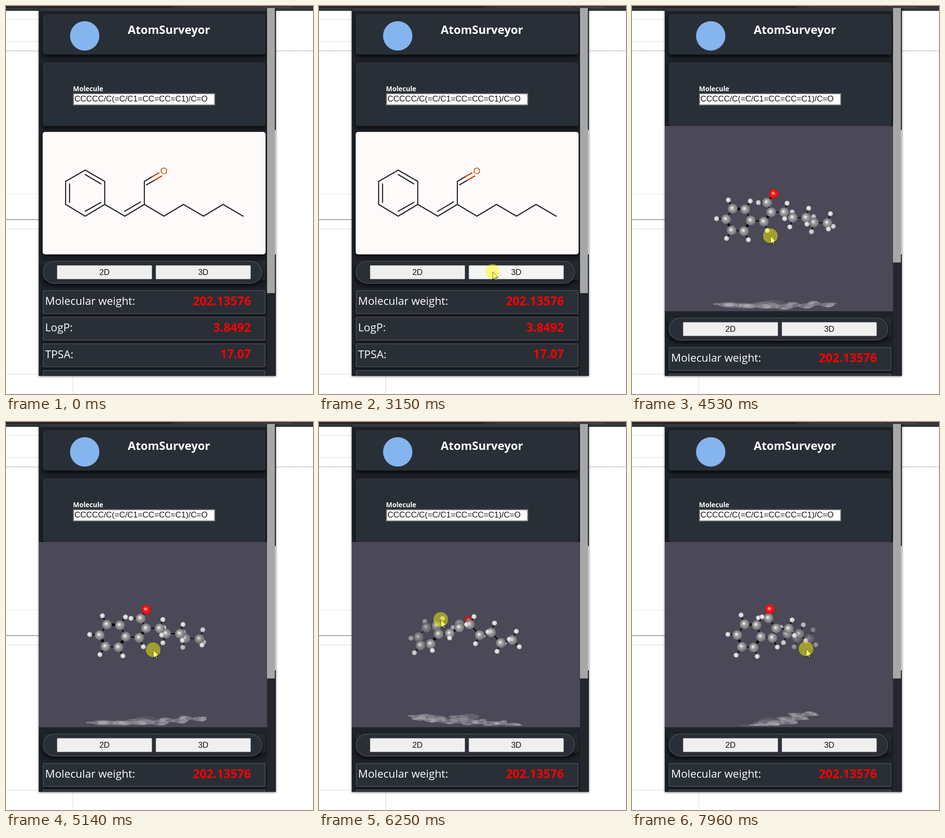
An HTML page with a canvas that plays this animation: 628 px wide and 792 px high, repeating every 8000 ms.

```html
<!DOCTYPE html>
<html lang="en">
<head>
<meta charset="utf-8">
<title>Molecule viewer</title>
<style>
  html, body { margin: 0; width: 100%; height: 100%; overflow: hidden; background: #fff; }
  svg, canvas { position: absolute; left: 0; top: 0; width: 628px; height: 792px; }
  text { font-family: "Open Sans", sans-serif; fill: #fff; }
  .ui { font: 16.6px "Liberation Sans", Arial, sans-serif; fill: #111; }
  .label { font-size: 22.3px; }
  .value { font-size: 24.5px; font-weight: 700; fill: #f00; text-anchor: end; }
  .card { fill: #292f36; filter: drop-shadow(0 5px 5px #000b); }
  .row { fill: #292f36; stroke: #41454b; stroke-width: 2; filter: drop-shadow(0 3px 3px #0008); }
  .button { fill: #efefef; stroke: #858585; }
  .bond { fill: none; stroke: #222; stroke-width: 2.2; stroke-linejoin: round; stroke-linecap: round; }
  .page { fill: none; stroke: #ddd; }
</style>
</head>
<body>
<svg viewBox="0 0 628 792">
  <defs>
    <clipPath id="popupClip"><path d="M67 4H552V755H67Z"/></clipPath>
    <linearGradient id="strip" x2="0" y2="1"><stop stop-color="#d8d8d8"/><stop offset="1" stop-color="#fff"/></linearGradient>
  </defs>

  <!-- page behind the popup -->
  <path fill="#35363a" d="M0 0H628V10H0Z"/>
  <path fill="#26272b" d="M0 0H340Q338 4 330 4H0Z"/>
  <path fill="none" stroke="#55575c" d="M362 0q4 3 12 3H520M524 0q4 3 12 3H578q6 0 8-3"/>
  <path fill="url(#strip)" d="M0 90H628V95H0Z"/>
  <path class="page" d="M0 27.5H67M0 72.5H67M0 455.5H67M0 751.5H136M136.5 755V792"/>
  <path class="page" stroke-opacity=".5" d="M0 383.5H67"/>
  <path fill="#aaa" d="M0 435H67V437H0Z"/>

  <!-- popup -->
  <path d="M67 4H552V755H67Z" fill="#1e2329" style="filter:drop-shadow(0 1px 2px #0009)"/>
  <g clip-path="url(#popupClip)">
    <path fill="#35363a" d="M67 4H534V10H67Z"/>
    <rect class="card" x="75" y="17" width="456" height="82" rx="5"/>
    <circle cx="161" cy="61" r="30" fill="#84b5ee"/>
    <text x="249" y="57" font-size="23.5" font-weight="700">AtomSurveyor</text>
    <rect class="card" x="75" y="115" width="456" height="130" rx="5"/>
    <text x="137" y="174" font-size="13.7" font-weight="700">Molecule</text>
    <rect x="138" y="179" width="289" height="23" fill="#fff" stroke="#767676" stroke-width="2"/>
    <text class="ui" x="140" y="195">CCCCC/C(=C/C1=CC=CC=C1)/C=O</text>

    <g id="flat">
      <rect x="75" y="257" width="456" height="250" rx="5" fill="#fffafa" style="filter:drop-shadow(0 4px 5px #000a)"/>
      <path class="bond" d="M122 358L162 335 202 358V405L162 429 122 405ZM130 363V401M162 344L194 363M162 419L194 401
        M202 405L243 429 283 405 323 429 363 405 404 429 444 405 485 429M243 419L275 400M283 405V358L299 348.5M287.5 365L303 356"/>
      <path class="bond" style="stroke:#c83200" d="M299 348.5L313 340.5M303 356L318.500 347"/>
      <text class="ui" x="323" y="343" text-anchor="middle" style="fill:#c4500c;font-size:19px">O</text>
    </g>
    <path id="solid" fill="#4b4857" d="M67 245H534V623H67Z"/>

    <g id="lower">
      <rect class="card" x="75" y="520" width="456" height="40" rx="5" opacity=".6"/>
      <rect class="row" x="76" y="521" width="447" height="45" rx="22.500" style="filter:drop-shadow(0 4px 4px #000b)"/>
      <rect class="button" x="104.5" y="529.5" width="194" height="28" rx="1.500"/>
      <rect class="button" id="button3d" x="306.5" y="529.5" width="194" height="28" rx="1.500"/>
      <g text-anchor="middle"><text class="ui" x="201.5" y="549">2D</text><text class="ui" x="403.5" y="549">3D</text></g>
      <g id="rows"></g>
    </g>

    <path fill="#23272d" d="M534 4H550V755H534Z"/>
    <rect id="thumb" x="534" y="4" width="16" fill="#a7a7a7"/>
    <path fill="#c8c8c8" d="M550 253H552V507H550Z"/>
  </g>
</svg>
<canvas width="628" height="792"></canvas>

<script>
const $ = id => document.getElementById(id);
const ctx = document.querySelector('canvas').getContext('2d');
const LOOP = 8000, CENTER = { x: 300.5, y: 434 }, CAMERA = 1600, PANEL = '#4b4857';

$('rows').innerHTML = [['Molecular weight:', '202.13576'], ['LogP:', '3.8492'], ['TPSA:', '17.07'], ['', '']]
  .map(([label, value], i) => `<g transform="translate(0 ${580 + i * 54.3})">
    <rect class="row" x="76" y="1" width="454" height="47" rx="2"/>
    <text class="label" x="80" y="30">${label}</text>
    <text class="value" x="501" y="30.500">${value}</text></g>`).join('');

// Atoms: element, bonded neighbour, x, y, depth (towards the viewer)
const atoms = [], bonds = [];
function addAtom(kind, parent, x, y, z, double = false) {
  atoms.push({ kind, x: x - CENTER.x, y: y - CENTER.y, z });
  if (parent !== null) bonds.push({ a: parent, b: atoms.length - 1, double });
}
function addRingAtom(kind, i, radius, parent) {
  const angle = (3 - 60 * i) * Math.PI / 180;
  const dx = radius * Math.cos(angle), dy = radius * Math.sin(angle);
  addAtom(kind, parent, 217.5 + dx, 436.5 + dy, .27 * dx - .06 * dy);
}
for (let i = 0; i < 6; i++) addRingAtom('C', i, 25.7, null);
for (let i = 0; i < 6; i++) bonds.push({ a: i, b: (i + 1) % 6, double: i % 2 === 1 });
for (let i = 1; i < 6; i++) addRingAtom('H', i, 45.5, i);
[
  ['C', 0, 270, 440, 12], ['H', 11, 277, 458, 20],
  ['C', 11, 285, 421, 7, true],
  ['C', 13, 276, 401, -7], ['O', 14, 290, 383, -18, true], ['H', 14, 258, 401, -18],
  ['C', 13, 311, 421, 17], ['H', 17, 317, 403, 20], ['H', 17, 312, 434, 33],
  ['C', 17, 329, 432, -4], ['H', 20, 328, 420, -22], ['H', 20, 323, 451, -8],
  ['C', 20, 356, 432, 5], ['H', 23, 361, 413, 11], ['H', 23, 357, 445, 23],
  ['C', 23, 373, 442, -17], ['H', 26, 373, 430, -34], ['H', 26, 368, 461, -20],
  ['C', 26, 400, 443, -6], ['H', 29, 406, 424, -2], ['H', 29, 413, 450, -19], ['H', 29, 401, 455, 12]
].forEach(atom => addAtom(...atom));

const LOOK = {
  C: { radius: 10, colors: ['#fff', '#a0a0a0', '#707070'] },
  H: { radius: 5, colors: ['#fff', '#dcdcdc', '#c4c4c4'] },
  O: { radius: 10, colors: ['#ffd0c8', '#fb1a14', '#e80808'] }
};

// Pointer keys: time, x, y
const pointerKeys = [
  [550, 483, 699], [740, 462, 679], [880, 462, 679], [1210, 390, 593], [1350, 390, 593],
  [1960, 361, 557], [2100, 361, 557], [2490, 355, 542], [4140, 355, 542], [4330, 283, 469],
  [4740, 283, 469], [5630, 322, 461], [6250, 249, 403], [6600, 238, 404], [6820, 238, 404],
  [7140, 377, 512], [7620, 414, 492], [7960, 356, 463], [8000, 356, 463]
];
// Molecule keys: time, yaw, pitch
const turnKeys = [
  [0, 0, 0], [4740, 0, 0], [5630, .42, .05], [6250, -.37, -.66], [6600, -.49, -.66], [6820, -.49, -.66],
  [7140, 1, .65], [7620, 1.3, .3], [7960, .79, .05], [8000, .79, .05]
];
function interpolate(keys, t) {
  const i = keys.findIndex(key => key[0] > t);
  if (i < 1) return null;
  const [t0, a0, b0] = keys[i - 1], [t1, a1, b1] = keys[i];
  const k = (t - t0) / (t1 - t0);
  return [a0 + (a1 - a0) * k, b0 + (b1 - b0) * k];
}

// Pitch about the molecule's own long axis, then yaw about the vertical
function project({ kind, x, y, z }, yaw, pitch) {
  const py = y * Math.cos(pitch) + z * Math.sin(pitch);
  const pz = z * Math.cos(pitch) - y * Math.sin(pitch);
  const depth = pz * Math.cos(yaw) - x * Math.sin(yaw);
  const scale = CAMERA / (CAMERA - depth);
  return {
    kind, depth,
    x: CENTER.x + (x * Math.cos(yaw) + pz * Math.sin(yaw)) * scale,
    y: CENTER.y + py * scale,
    alpha: 1 - Math.min(.85, Math.max(0, -depth - 8) / 105)
  };
}

function drawShadow({ kind, x, y, depth }) {
  const height = Math.max(0, 460 - y) / 80;
  const rx = LOOK[kind].radius * (1.15 + 1.4 * height);
  ctx.fillStyle = `rgba(185,185,188,${.5 - .4 * height})`;
  ctx.beginPath();
  ctx.ellipse(x, 611 + .2 * depth, rx, rx * .31, 0, 0, 7);
  ctx.fill();
}

function drawBond(a, b, double) {
  ctx.globalAlpha = Math.min(a.alpha, b.alpha);
  ctx.strokeStyle = '#000';
  ctx.lineWidth = double ? 5 : 2;
  ctx.beginPath();
  ctx.moveTo(a.x, a.y);
  ctx.lineTo(b.x, b.y);
  ctx.stroke();
  ctx.globalAlpha = 1;
}

function drawAtom({ kind, x, y, alpha }) {
  const { radius: r, colors } = LOOK[kind];
  const shade = ctx.createRadialGradient(x - r * .2, y - r * .2, 0, x, y, r);
  shade.addColorStop(0, colors[0]);
  shade.addColorStop(.45, colors[1]);
  shade.addColorStop(1, colors[2]);
  ctx.beginPath();
  ctx.arc(x, y, r, 0, 7);
  ctx.fillStyle = PANEL;
  ctx.fill();
  ctx.globalAlpha = alpha;
  ctx.fillStyle = shade;
  ctx.fill();
  ctx.globalAlpha = 1;
}

function drawMolecule(yaw, pitch) {
  const points = atoms.map(atom => project(atom, yaw, pitch));
  ctx.save();
  ctx.beginPath();
  ctx.rect(67, 245, 467, 375);
  ctx.clip();
  points.forEach(drawShadow);
  const parts = points.map(p => ({ depth: p.depth, draw: () => drawAtom(p) }));
  // A bond lies just behind its farther atom, so both ends stay covered
  for (const { a, b, double } of bonds) {
    const from = points[a], to = points[b];
    parts.push({ depth: Math.min(from.depth, to.depth) - .1, draw: () => drawBond(from, to, double) });
  }
  parts.sort((p, q) => p.depth - q.depth).forEach(part => part.draw());
  ctx.restore();
}

const arrow = new Path2D('M.5 .5V16.500L4.200 13 6.700 18.500 8.800 17.500 6.400 12H11.500Z');
function drawPointer(x, y, pressed) {
  ctx.save();
  ctx.translate(Math.round(x), Math.round(y));
  ctx.fillStyle = '#fff';
  ctx.strokeStyle = '#000';
  ctx.lineWidth = 1;
  ctx.fill(arrow);
  ctx.stroke(arrow);
  if (pressed) {
    ctx.fillStyle = 'rgba(255,255,0,.47)';
    ctx.beginPath();
    ctx.arc(0, 0, 15, 0, 7);
    ctx.fill();
  }
  ctx.restore();
}

function render(t) {
  const solid = t >= 3350;
  const pressed = (t >= 3150 && t < 3350) || t >= 4530;
  const pointer = interpolate(pointerKeys, t);
  const hover = !solid && pointer && pointer[0] > 306 && pointer[0] < 501 && pointer[1] < 558;

  $('flat').style.display = solid ? 'none' : '';
  $('solid').style.display = solid ? '' : 'none';
  $('lower').setAttribute('transform', `translate(0 ${solid ? 116 : 0})`);
  $('thumb').setAttribute('height', solid ? 519.5 : 582);
  $('button3d').style.fill = hover ? (pressed ? '#f5f5f5' : '#e5e5e5') : '';

  ctx.clearRect(0, 0, 628, 792);
  if (t >= 3540) drawMolecule(...interpolate(turnKeys, t));
  if (pointer) drawPointer(...pointer, pressed);
}

const start = performance.now();
function tick() {
  render((performance.now() - start) % LOOP);
  requestAnimationFrame(tick);
}
tick();
</script>
</body>
</html>
```
